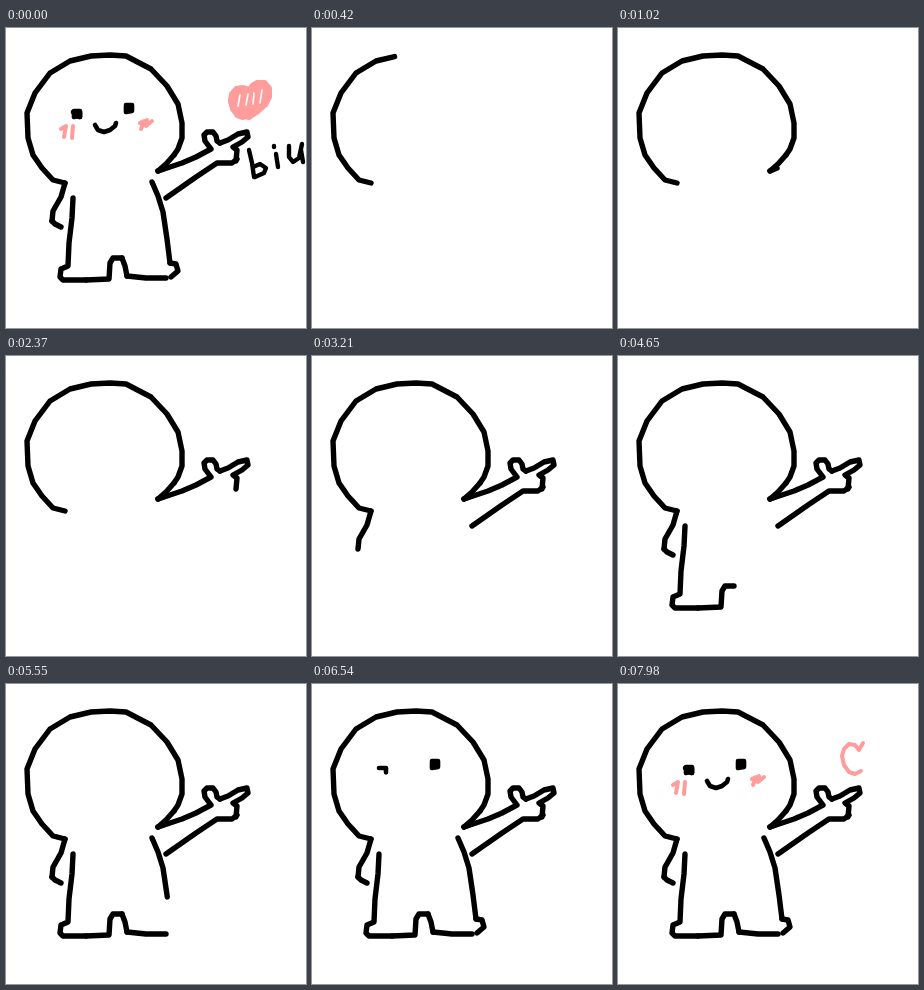
An HTML page that plays this animation: 300x300 px, repeating every 8000 ms.

```html
<!DOCTYPE html>
<html lang="en">
<head>
<meta charset="utf-8">
<style>
  html, body { margin: 0; width: 100%; height: 100%; overflow: hidden; background: #fff; }
  svg { display: block; width: 100vw; height: 100vh; fill: none; stroke-linecap: round; stroke-linejoin: round; }
</style>
</head>
<body>
<svg viewBox="0 0 300 300"></svg>
<script>
const LOOP = 8000, STEP = 30;
const INK = { color: '#000', width: 5.4 };
const FACE = { color: '#000', width: 4.6 };
const BLUSH = { color: '#ff9d9d', width: 4 };

// Pen strokes: start ms, end ms, pen, path
const strokes = [
  // head
  [0, 810, INK, 'M59 155L47 152 36 140 27 127 22 110 21 85 29 65 44 45 64 33 85 28 104 27 120 28 145 41 161 58 172 76 176 95 176 110 172 121 168 127'],
  [810, 930, INK, 'M168 127L160 136 152 143'],
  // pointing arm and hand
  [930, 1020, INK, 'M152 143L159 140'],
  [1020, 1620, INK, 'M152 143L176 135 190 129 205 121 199 113 198 107 201 104 207 104 210 108 211 113 214 115'],
  [1620, 2370, INK, 'M214 115L222 112 232 106 241 104 242 109 236 114 227 119 231 122 230 133'],
  [2430, 2880, INK, 'M231 131L226 135 211 135 190 149 160 170'],
  // other arm
  [2910, 3210, INK, 'M59 155L55 169 47 183 46 193'],
  [3240, 3360, INK, 'M46 193L49 196 55 199'],
  // body and legs
  [3390, 4050, INK, 'M67 170L66 190 63 215 62 238 55 241 54 249 57 252 80 252'],
  [4050, 4650, INK, 'M80 252L103 251 104 235 107 230 116 230'],
  [4650, 4860, INK, 'M116 230L119 238 121 248'],
  [4890, 5190, INK, 'M121 248L140 250 160 250'],
  [5220, 5670, INK, 'M146 154L152 168 157 184 161 211 164 235'],
  [5670, 5970, INK, 'M164 235L170 236 172 243 165 249'],
  // eyes and mouth
  [6030, 6390, FACE, 'M120 77L126 77 126 83 120 84 120 78 124 79 122 82'],
  [6450, 6570, FACE, 'M67 84L74 84 74 89 71 88'],
  [6570, 6720, FACE, 'M71 88L68 89 68 83 74 83 74 89 69 88 72 86'],
  [6750, 6990, FACE, 'M89 97L92 102 98 104 104 102 109 98 110 95'],
  // cheeks
  [7020, 7110, BLUSH, 'M134 95L138 93 135 101'],
  [7110, 7200, BLUSH, 'M141 92L140 98 146 93'],
  [7230, 7380, BLUSH, 'M55 101L60 98 58 109'],
  [7410, 7560, BLUSH, 'M67 98L66 110'],
  // heart outline begins
  [7620, 7980, BLUSH, 'M245 59L241 66 237 61 231 60 226 65 224 72 226 81 231 88 237 90 243 87']
];

const svg = document.querySelector('svg');

function add(parent, tag, attributes) {
  const node = document.createElementNS(svg.namespaceURI, tag);
  for (const name in attributes) node.setAttribute(name, attributes[name]);
  return parent.appendChild(node);
}

const addPath = (parent, pen, d, extra) =>
  add(parent, 'path', { d, stroke: pen.color, 'stroke-width': pen.width, ...extra });

const lines = strokes.map(([start, end, pen, d]) =>
  ({ start, end, node: addPath(svg, pen, d, { pathLength: 1 }) }));

// Parts seen only in the finished drawing
const finished = add(svg, 'g', {});
addPath(finished, BLUSH, 'M243 61L237 59 230 60 225 66 224 74 228 82 234 88 243 90 252 84 260 77 264 69 264 60 259 54 251 54 246 57Z', { fill: BLUSH.color });
addPath(finished, { color: '#fff', width: 1.6 }, 'M234 67L232 78M242 66L240 77M248 65L247 76M256 62L254 75');
addPath(finished, { color: '#000', width: 4.4 }, 'M243 122L246 135 248 149M247 139L254 136 260 140 258 145 249 149M268 118L268 119M270 126L272 139M283 118L283 129 287 134 293 130 296 116M295 122L297 134');

function draw(now) {
  const time = Math.floor(now % LOOP / STEP) * STEP;
  const complete = time === 0;
  finished.style.display = complete ? '' : 'none';
  for (const { start, end, node } of lines) {
    const progress = complete ? 1 : Math.min(1, (time - start) / (end - start));
    node.style.display = progress > 0 ? '' : 'none';
    node.setAttribute('stroke-dasharray', progress < 1 ? `${Math.max(0, progress)} 2` : 'none');
  }
}

const origin = performance.now();
function tick() {
  draw(performance.now() - origin);
  requestAnimationFrame(tick);
}
tick();
</script>
</body>
</html>
```
